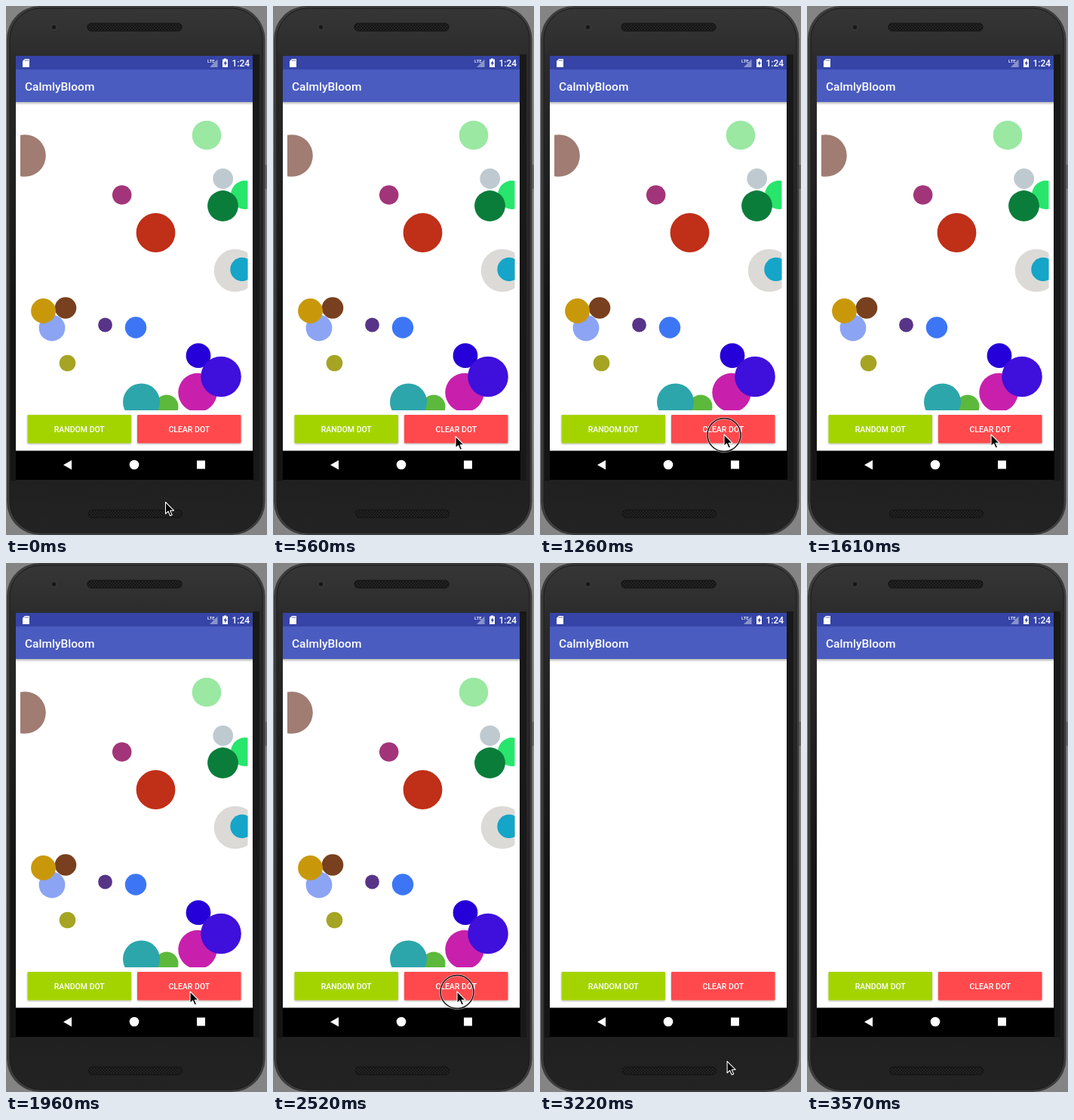
These frames come from a looping animation (346x700 px, 3640 ms). An HTML page:

```html
<!DOCTYPE html>
<html lang="en">
<head>
<meta charset="utf-8">
<title>Dots</title>
<style>
  html, body { margin: 0; width: 100%; height: 100%; overflow: hidden; background: #848484; }
  svg { display: block; width: 346px; height: 700px; }
  text { font-family: Roboto, sans-serif; font-weight: 500; fill: #fff; }
</style>
</head>
<body>
<svg viewBox="0 0 346 700">
  <defs>
    <linearGradient id="body" x2="0" y2="1">
      <stop offset="0" stop-color="#363636"/>
      <stop offset=".1" stop-color="#2b2b2b"/>
      <stop offset=".9" stop-color="#202020"/>
      <stop offset="1" stop-color="#232323"/>
    </linearGradient>
    <linearGradient id="side" x2="0" y2="1">
      <stop offset="0" stop-color="#2b2b2b"/>
      <stop offset=".6" stop-color="#151515"/>
    </linearGradient>
    <linearGradient id="shade" x2="0" y2="1">
      <stop offset="0" stop-color="#000" stop-opacity=".28"/>
      <stop offset="1" stop-color="#000" stop-opacity="0"/>
    </linearGradient>
    <filter id="lift" x="-5%" y="-20%" width="110%" height="140%">
      <feDropShadow dx="0" dy="1" stdDeviation="1" flood-opacity=".35"/>
    </filter>
    <pattern id="mesh" width="4" height="4" patternUnits="userSpaceOnUse">
      <rect width="4" height="4" fill="#151515"/>
      <circle cx="1" cy="1" r=".8" fill="#363636"/>
      <circle cx="3" cy="3" r=".8" fill="#363636"/>
    </pattern>
    <clipPath id="area"><rect x="19" y="133" width="301.5" height="402"/></clipPath>
  </defs>

  <!-- phone -->
  <rect width="346" height="700" fill="#848484"/>
  <rect x="343" y="210" width="3" height="32" rx="1" fill="#666"/>
  <rect x="1" y="0" width="342.500" height="700" rx="44" fill="#3c3c3c"/>
  <rect x="5" y="3" width="335" height="694" rx="41" fill="url(#body)" stroke="#1b1b1b"/>
  <rect x="6" y="64" width="7" height="564" fill="url(#side)"/>
  <rect x="327" y="64" width="9" height="564" fill="#191919"/>
  <rect x="108" y="23" width="125" height="10" rx="4.500" fill="url(#mesh)" stroke="#111"/>
  <rect x="109.500" y="667" width="124" height="10" rx="4.500" fill="url(#mesh)" stroke="#111"/>
  <circle cx="63.500" cy="28" r="4" fill="#222" stroke="#414141"/>
  <circle cx="63.500" cy="28" r="1.600" fill="#111"/>

  <!-- screen -->
  <rect x="13" y="66" width="314" height="523" fill="#fff"/>
  <rect x="13" y="66" width="314" height="18.500" fill="#3544a6"/>
  <rect x="13" y="84" width="314" height="43" fill="#4a5cc0"/>
  <rect x="13" y="127" width="314" height="4" fill="url(#shade)"/>
  <path d="M25 70h6v11h-9v-8z" fill="#fff"/>
  <path d="M25.500 71v2M27.500 71v2M29.300 71v2" stroke="#3544a6" stroke-width=".7"/>
  <text x="267" y="75.300" font-size="6">LTE</text>
  <path d="M280.500 70.500V81H270z" fill="#8993cc"/>
  <path d="M289 69.500h3v1h2V81h-7V70.500h2z" fill="#fff"/>
  <path d="M291.500 72l-3 4.300h1.700v3l2.800-4.400h-1.500z" fill="#3544a6"/>
  <text x="299.500" y="80" font-size="12">1:24</text>
  <text x="25" y="112" font-size="15.500">CalmlyBloom</text>

  <g id="dots" clip-path="url(#area)"></g>

  <g id="buttons"></g>

  <rect x="13" y="588.500" width="315" height="38.500" fill="#000"/>
  <path d="M87 601v12.500l-11-6.250z" fill="#fff"/>
  <circle cx="170" cy="607" r="6.300" fill="#fff"/>
  <rect x="253" y="601.500" width="11" height="11" fill="#fff"/>

  <g id="ring" fill="none">
    <circle cx="244" cy="567.500" r="22" stroke="#fff" stroke-opacity=".6" stroke-width="3"/>
    <circle cx="244" cy="567.500" r="22" stroke="#151515" stroke-width="1.500"/>
  </g>
  <path id="cursor" d="M0 0V15.500L3.600 12.200L6.100 18L8.600 16.900L6.200 11.200H11Z"
        fill="#000" stroke="#fff" stroke-width="1.100" stroke-linejoin="round"/>
</svg>
<script>
const LOOP = 3640, STEP = 70;
const $ = id => document.getElementById(id);

function add(parent, tag, attrs, text) {
  const el = document.createElementNS('http://www.w3.org/2000/svg', tag);
  for (const key in attrs) el.setAttribute(key, attrs[key]);
  if (text) el.textContent = text;
  parent.appendChild(el);
}

const dots = [
  [25, 198, 27.8, '#a07c72'],
  [266, 171, 19.3, '#9ae8a2'],
  [287.7, 228.5, 13.4, '#bfcad0'],
  [317, 250, 19, '#28e56c'],
  [287.5, 264.5, 20.4, '#0a7d3a'],
  [153.7, 250, 12.8, '#a23579'],
  [198.5, 300, 25.9, '#c02f18'],
  [304, 350, 28.3, '#dcdad7'],
  [313, 348.5, 15.7, '#14a5c8'],
  [61, 426, 17.4, '#8ca4f4'],
  [79, 399.5, 14.3, '#78401e'],
  [49.5, 403.5, 16.4, '#c9980a'],
  [131.5, 422, 9.4, '#573487'],
  [172, 425.5, 14.2, '#3d76f5'],
  [81.5, 472.5, 10.8, '#a5a423'],
  [213, 530, 15.5, '#5cb93c'],
  [179.5, 524, 24.5, '#2ca6ab'],
  [254, 511.5, 25.7, '#c820ac'],
  [255, 462.7, 16.4, '#2500d8'],
  [285, 490.5, 26.8, '#3f0fdc']
];
for (const [cx, cy, r, fill] of dots) add($('dots'), 'circle', { cx, cy, r, fill });

function button(x, width, fill, label) {
  const g = $('buttons');
  add(g, 'rect', { x, y: 541, width, height: 37.5, rx: 1, fill, filter: 'url(#lift)' });
  add(g, 'text', { x: x + width / 2, y: 564, 'font-size': 10.5, 'text-anchor': 'middle' }, label);
}
button(28.5, 137.5, '#a4d400', 'RANDOM DOT');
button(174, 137.5, '#ff4a4d', 'CLEAR DOT');

// time, x, y of the pointer tip
const path = [
  [0, 211.5, 656.5],
  [560, 242, 569.5],
  [1120, 244, 567],
  [2870, 244, 567],
  [3430, 250, 702]
];
const ease = p => p * p * (3 - 2 * p);

function pointer(t) {
  let i = 0;
  while (i < path.length - 2 && t >= path[i + 1][0]) i++;
  const [t0, x0, y0] = path[i], [t1, x1, y1] = path[i + 1];
  const p = ease(Math.min(1, (t - t0) / (t1 - t0)));
  return [x0 + (x1 - x0) * p, y0 + (y1 - y0) * p];
}

const within = (t, a, b) => t >= a && t < b;
const show = (id, on) => $(id).setAttribute('visibility', on ? 'visible' : 'hidden');

function draw(now) {
  const t = Math.floor(now % LOOP / STEP) * STEP;
  $('cursor').setAttribute('transform', `translate(${pointer(t)})`);
  show('ring', within(t, 1190, 1400) || within(t, 2450, 2660));
  show('dots', t < 2660);
}

let start;
function tick(now) {
  start ??= now;
  draw(now - start);
  requestAnimationFrame(tick);
}
draw(0);
requestAnimationFrame(tick);
</script>
</body>
</html>
```
